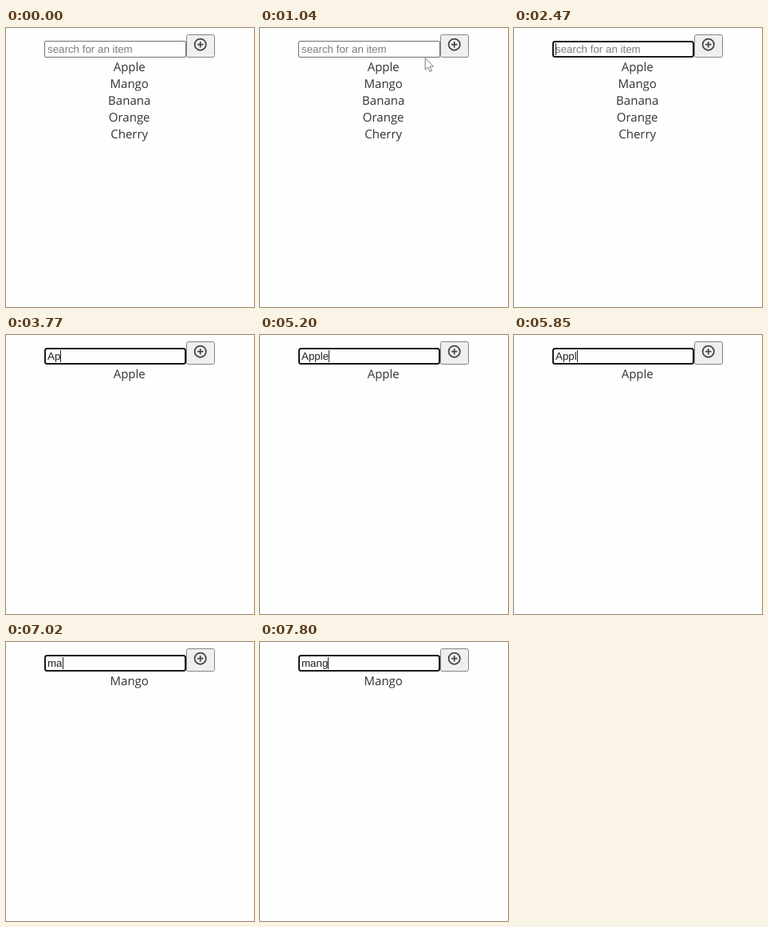
Write an HTML page that moves like this. It is 311x349 px and loops after 8000 ms.

```html
<!DOCTYPE html>
<html lang="en">
<head>
<meta charset="utf-8">
<title>Search filter</title>
<style>
  html, body { margin: 0; width: 100%; height: 100%; overflow: hidden; background: #fefefe; }
  svg { display: block; text-rendering: geometricPrecision; }
  #list { font: 15px "Open Sans", sans-serif; fill: #303336; text-anchor: middle; }
  #value { font: 13.333px "Liberation Sans", Arial, sans-serif; white-space: pre; }
</style>
</head>
<body>
<svg width="311" height="349" viewBox="0 0 311 349">
  <rect id="field" fill="#fefefe"/>
  <text id="value" x="52" y="31"></text>
  <rect id="caret" y="19" width="1" height="15" fill="#222"/>
  <rect x="226.5" y="8.5" width="35" height="28" rx="2" fill="#efefef" stroke="#858585"/>
  <g fill="none" stroke="#444" stroke-width="1.7">
    <circle cx="243.7" cy="20.7" r="7.1"/>
    <path d="M240 20.7h7.4M243.7 17v7.4"/>
  </g>
  <g id="list"></g>
  <path id="pointer" d="M.5 .5V15.2L3.9 12L6.2 17.4L8.6 16.4L6.3 11.1H10.8Z" fill="#fff" stroke="#777"/>
</svg>
<script>
const DURATION = 8000, BLINK = 520, FOCUS = 2080;
const items = ["Apple", "Mango", "Banana", "Orange", "Cherry"];

// [time, field content]
const typing = [
  [FOCUS, ""], [3120, "A"], [3770, "Ap"], [4030, "App"], [4550, "Appl"], [4940, "Apple"],
  [5850, "Appl"], [5980, "App"], [6110, "Ap"], [6240, "A"], [6370, ""],
  [6630, "m"], [6890, "ma"], [7280, "man"], [7800, "mang"]
];

// [time, x, y]; without a position the pointer is hidden
const moves = [[0], [390, 238, 173], [520, 216, 84], [780, 211, 56], [910, 208, 42], [1040, 206.7, 37], [1170]];

const $ = id => document.getElementById(id);
const latest = (steps, t) => steps.findLast(step => step[0] <= t);

function set(el, attrs) {
  for (const name in attrs) el.setAttribute(name, attrs[name]);
}

function drawField(focused, text) {
  const w = focused ? 2 : 1, inset = w / 2;
  set($("field"), {
    x: 48 + inset, y: 16 + inset, width: 178 - w, height: 21 - w,
    rx: focused ? 2.5 : 1.5, stroke: focused ? "#1a1a1a" : "#707070", "stroke-width": w
  });
  $("value").textContent = text || "search for an item";
  set($("value"), { fill: text ? "#222" : "#7d7d7d" });
}

function drawCaret(text, idle) {
  const on = Math.floor(idle / BLINK) % 2 === 0;
  const width = text ? $("value").getComputedTextLength() : 0;
  set($("caret"), { x: 52 + Math.round(width), visibility: on ? "visible" : "hidden" });
}

function drawList(text) {
  const found = items.filter(item => item.toLowerCase().includes(text.toLowerCase()));
  $("list").innerHTML = found.map((item, i) => `<text x="154.7" y="${54 + 21 * i}">${item}</text>`).join("");
}

function drawPointer(t) {
  const [, x, y] = latest(moves, t);
  set($("pointer"), x === undefined
    ? { visibility: "hidden" }
    : { visibility: "visible", transform: `translate(${x} ${y})` });
}

function frame() {
  const t = performance.now() % DURATION;
  const [since, text] = latest(typing, t) || [Infinity, ""];
  drawField(t >= FOCUS, text);
  if (t >= FOCUS) drawCaret(text, t - since);
  else set($("caret"), { visibility: "hidden" });
  drawList(text);
  drawPointer(t);
  requestAnimationFrame(frame);
}
frame();
</script>
</body>
</html>
```
